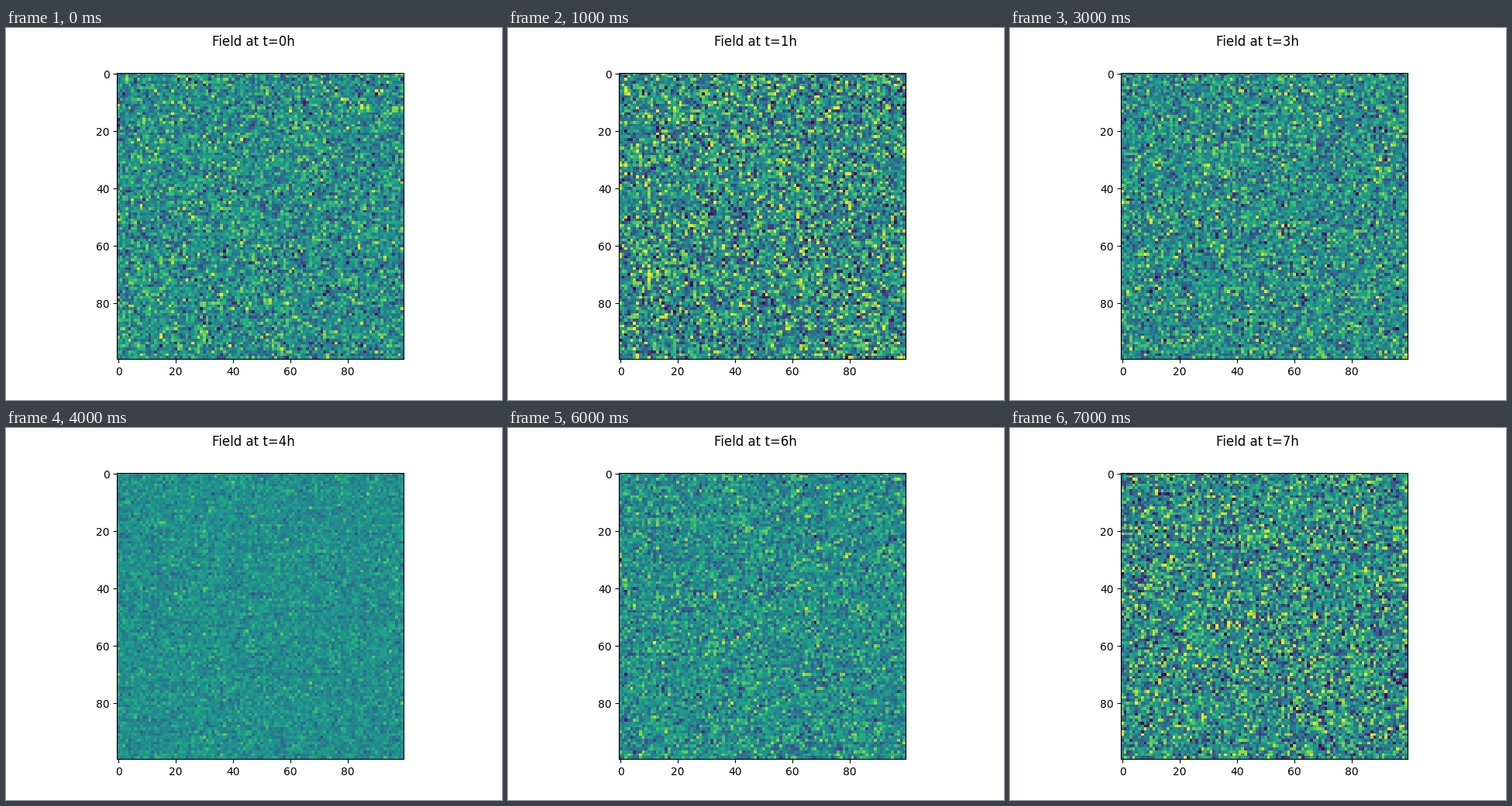
A matplotlib script that plays this animation: 640x480 px, repeating every 8 s.

```python
import math

import matplotlib.pyplot as plt
import numpy as np
from matplotlib.animation import FuncAnimation

SIZE = 100
HOURS = 8
LIMIT = 3


def field(hour):
    """Gaussian noise whose variance swings with the hour."""
    rng = np.random.default_rng(40 + hour)
    spread = math.sqrt(1 + math.sin(hour))
    return rng.normal(0, spread, (SIZE, SIZE))


fig, ax = plt.subplots(figsize=(6.4, 4.8), dpi=100)
image = ax.imshow(field(0), cmap="viridis", vmin=-LIMIT, vmax=LIMIT,
                  interpolation="nearest")
title = fig.suptitle("Field at t=0h", x=0.499, y=0.982)


def update(hour):
    image.set_data(field(hour))
    title.set_text(f"Field at t={hour}h")
    return image, title


anim = FuncAnimation(fig, update, frames=HOURS, interval=1000,
                     repeat=True, repeat_delay=0, blit=False)
plt.show()
```
